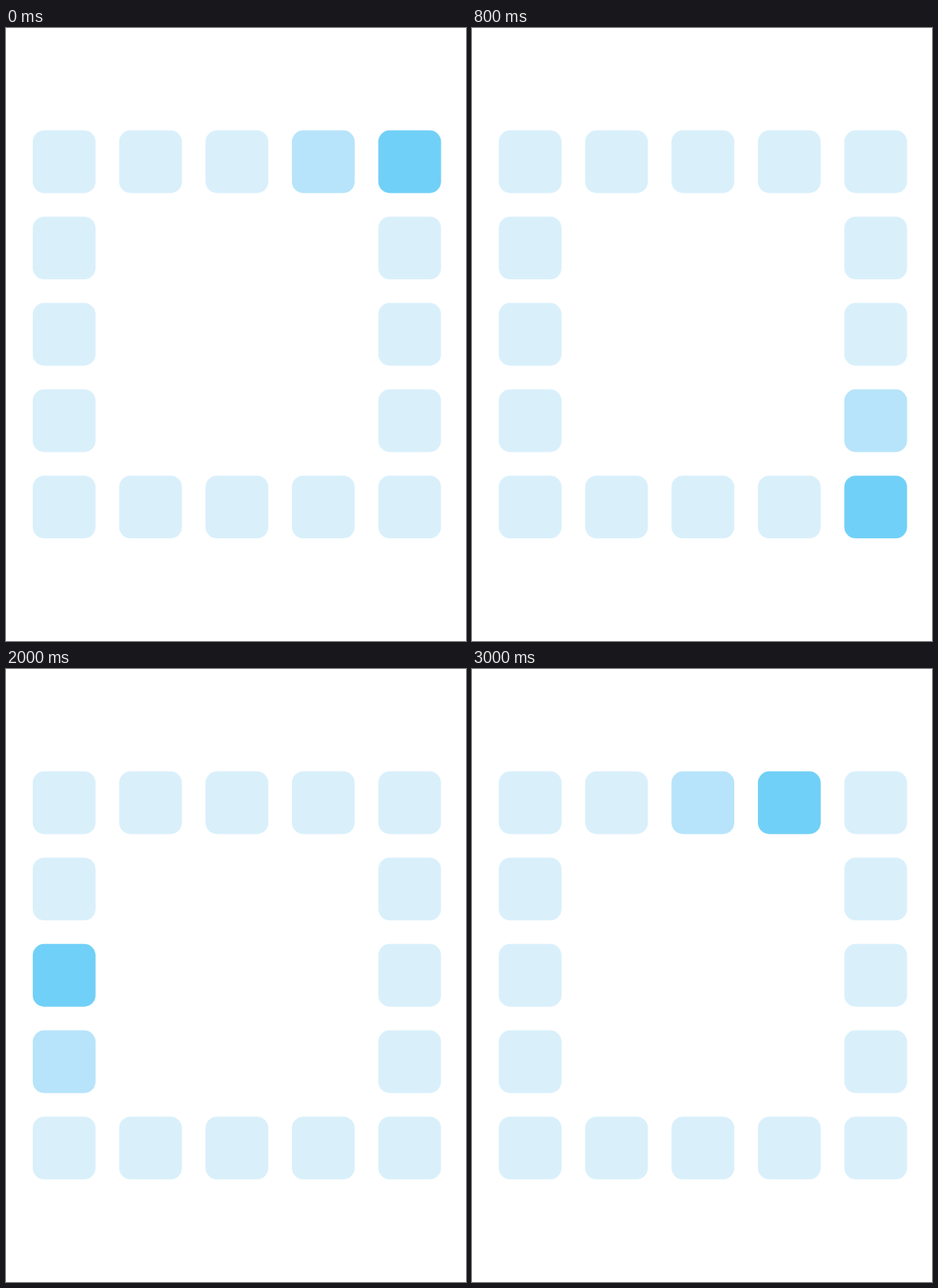
Write an HTML page that moves like this. It is 600x800 px and loops after 3200 ms.

```html
<!DOCTYPE html>
<html lang="en">
<head>
<meta charset="utf-8">
<title>Square loader</title>
<style>
  html, body { margin: 0; width: 100%; height: 100%; overflow: hidden; background: #fff; }
  svg { display: block; width: 600px; height: 800px; }
  rect {
    fill: #d9f0fb;
    animation: chase 3200ms step-end infinite;
  }
  @keyframes chase {
    0% { fill: #71d0f7; }
    6.25% { fill: #b7e4fa; }
    12.5%, 100% { fill: #d9f0fb; }
  }
</style>
</head>
<body>
<svg id="ring" viewBox="0 0 600 800"></svg>
<script>
  const SIDE = 4, COUNT = SIDE * 4, STEP = 112.67, SIZE = 81.9, LEFT = 34.9, TOP = 133.5;
  const ring = document.getElementById('ring');

  // Clockwise from the top right corner
  function cell(i) {
    const k = i % SIDE;
    return [[SIDE, k], [SIDE - k, SIDE], [0, SIDE - k], [k, 0]][Math.floor(i / SIDE)];
  }

  for (let i = 0; i < COUNT; i++) {
    const [col, row] = cell(i);
    const rect = document.createElementNS('http://www.w3.org/2000/svg', 'rect');
    const attrs = { x: LEFT + col * STEP, y: TOP + row * STEP, width: SIZE, height: SIZE, rx: 15 };
    for (const key in attrs) rect.setAttribute(key, attrs[key]);
    rect.style.animationDelay = (i - COUNT) * 200 + 'ms';
    ring.append(rect);
  }
</script>
</body>
</html>
```
